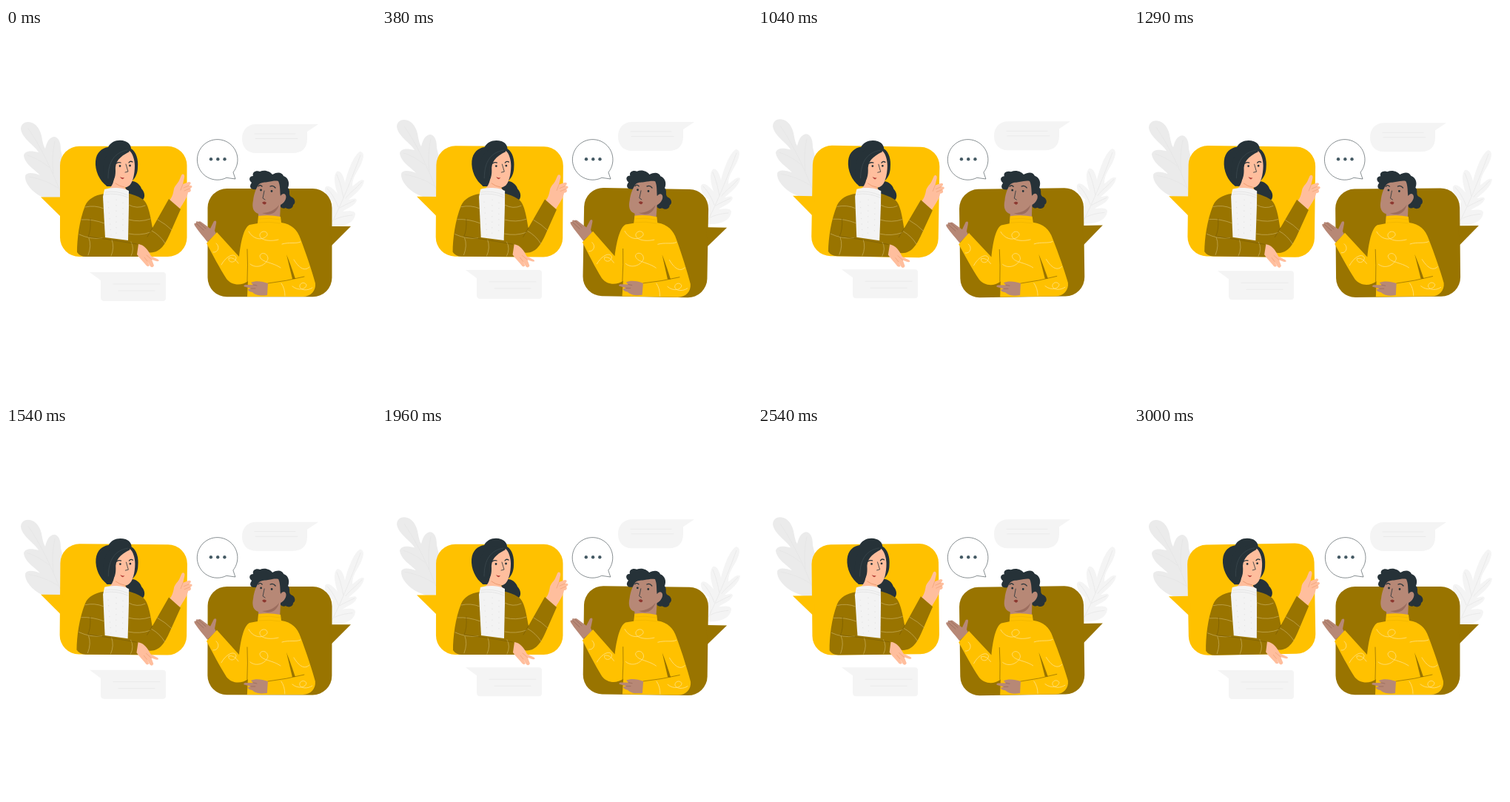
An HTML page for the animation above (3040 ms loop, 500 px wide and 500 px high).

```html
<!DOCTYPE html>
<html lang="en">
<head>
<meta charset="utf-8">
<title>Conversation</title>
<style>
  html, body { margin: 0; width: 100%; height: 100%; overflow: hidden; background: #fff; }
  svg { display: block; width: 100%; height: 100%; }
  .line { fill: none; stroke-linecap: round; stroke-linejoin: round; }
  .pale { fill: #f4f4f4; }
  .leaf { fill: #ebebeb; }
  .rule { stroke: #e8e8e8; stroke-width: .8; }
  .vein { stroke: #e2e2e2; stroke-width: .6; }
  .gold { fill: #ffc100; }
  .olive { fill: #997400; }
  .dark { fill: #263238; }
  .ink { stroke: #263238; stroke-width: .8; }
  .brow { stroke: #263238; stroke-width: 1.300; }
  .rose { fill: #ffbe9d; }
  .brown { fill: #b78876; }
  .crease { stroke: #eb996e; stroke-width: .6; }
  .stripe { stroke: #d1b970; stroke-width: .6; }
  .curl { stroke: #ffe38c; stroke-width: .8; }
  .fold { stroke: #765900; stroke-width: .6; }
</style>
</head>
<body>
<svg viewBox="0 0 500 500">
  <g class="float">
    <path class="leaf" d="M76 236 L62 234 L48 228 C36 222 25 210 26 200 C28 194 38 196 46 199 C40 192 25 184 24 172 C26 165 35 166 44 168 C39 159 21 149 20 136 C21 125 33 125 40 131 C51 142 47 153 53 163 C55 155 58 147 66 147 C73 149 74 158 74 165 L80 190 V236Z"/>
    <path class="line vein" d="M30 136 C42 153 56 178 73 220 M29 172 C42 176 50 182 58 188 M31 201 C48 204 59 209 70 216 M66 153 C63 168 62 180 64 197"/>
  </g>
  <g class="float">
    <path class="pale" d="M436 268 L442 235 C434 229 430 222 431 216 C435 210 443 218 448 224 C444 212 442 199 447 194 C453 191 457 203 458 209 C461 197 468 174 478 167 C484 167 484 174 481 181 C477 193 468 199 468 214 C473 211 479 203 484 206 C483 216 472 224 463 232 C467 232 473 228 474 233 C471 241 461 243 455 248 C462 247 471 246 472 251 C471 264 456 269 440 268Z"/>
    <path class="line vein" d="M479 172 C468 201 456 232 441 262 M447 198 C452 209 454 220 456 229 M434 217 C441 224 446 234 449 242 M481 208 C472 218 464 223 459 230 M471 233 C463 237 456 240 451 243 M468 253 C458 254 449 256 444 259"/>
  </g>
  <g class="float">
    <path class="pale" d="M338 130 H422 L407 140 V150 C407 163 399 169 388 169 H338 C326 169 319 161 319 150 C319 138 326 130 338 130Z"/>
    <path class="line rule" d="M336 143 H391 M337 149.5 H394"/>
  </g>
  <g class="float">
    <path class="pale" d="M113 330 H212 Q216 330 216 334 V365 Q216 369 212 369 H133 Q128 369 128 364 V341Z"/>
    <path class="line rule" d="M145 346 H208 M152 355 H201"/>
  </g>

  <g id="woman">
    <rect class="gold" x="73" y="159.700" width="171.500" height="149.300" rx="26"/>
    <path class="gold" d="M47 228.500 H76 V254 H73Z"/>
    <!-- hair behind the face -->
    <path class="dark" d="M162 208 C172 204 181 210 183 217 C188 222 189 230 183 234 C176 233 169 227 161 222Z"/>
    <path class="dark" d="M137 214 C126 207 120 192 121 180 C122 168 130 162 138 161 C142 153 152 150 161 153 C167 155 169 160 169 163 C176 167 179 178 178 188 C178 196 175 202 171 206 L150 214Z"/>
    <path class="rose" d="M136 220 C143 215 145 210 146 203 C146 192 146 179 151 173 C157 170 164 168 167 166 C171 169 174 178 174 186 C174 198 171 211 165 214 Q162 216 160 215 L165 221 Q148 224 136 220Z"/>
    <path class="line" stroke="#eb996e" stroke-width=".9" d="M148 210 Q153 214 160 215"/>
    <path class="dark" d="M136 214 C146 209 148 202 148 193 C147 181 153 174 167 167 L160 162 C145 161 136 168 133 179 C130 192 130 205 136 214Z"/>
    <path class="line" stroke="#46545a" stroke-width=".5" d="M164 165 C147 168 138 180 138 203"/>
    <path class="line brow" d="M149 183 Q152 181 155 182 M166 182 Q168 179 171 181"/>
    <path class="line ink" d="M162 184 L165 194 L161 195"/>
    <circle class="dark" cx="154" cy="186.500" r="1.400"/><circle class="dark" cx="167.500" cy="186" r="1.400"/>
    <path fill="#b53e36" d="M154 201 Q157 203 160 202 Q157 207 154 201Z"/>
    <!-- raised hand -->
    <path class="rose" d="M221 233 C225 228 226 223 227 217 C229 212 232 210 234 206 L237 199 C239 196 242 198 241 202 L239 211 L247 208 C251 208 250 211 247 213 C252 212 253 215 249 217 C251 220 249 222 246 222 C245 229 240 236 235 244Z"/>
    <path class="line crease" d="M239 211 L236 219 M247 213 L240 216 M248 217 L241 220"/>
    <!-- jacket -->
    <path class="olive" d="M132 224 C120 226 111 231 107 240 C99 260 96 285 96 303 Q100 309 108 309 H182 L191 303 C208 306 215 292 221 279 L236 245 L220 231 L198 270 C195 253 192 235 184 231 C178 227 171 225 164 223Z"/>
    <path fill="#f3f3f3" d="M133 218 C141 215 158 215 166 220 L166 240 L165 287 L134 283 L131 228Z"/>
    <path class="line" stroke="#dcdcdc" stroke-width=".6" d="M134 222 Q149 219 165 226 M133 225 Q149 222 165 229"/>
    <path class="line" stroke="#d8d8d8" stroke-width=".6" stroke-dasharray=".5 7" d="M138 235 L142 280 M149 232 V280 M158 236 V280"/>
    <path class="line stripe" d="M107 242 Q120 239 132 244 M102 259 Q117 258 133 264 M99 279 Q114 286 130 284 M166 239 Q177 245 188 240 M166 259 Q181 263 195 258 M166 278 Q181 281 195 276 M112 284 Q116 294 111 307 M143 286 Q147 297 142 308 M169 289 Q174 298 169 308 M197 274 Q208 280 215 291 M205 259 Q216 265 224 273"/>
    <path class="line fold" d="M114 258 Q115 274 111 282 Q143 286 177 292 M198 270 L191 282"/>
    <!-- resting hand -->
    <path class="rose" d="M179 292 C187 293 192 300 196 308 L206 313 Q208 316 203 315 L197 313 L200 321 Q198 325 195 322 L191 315 L194 321 Q191 324 188 319 L180 310 L177 306Z"/>
    <path class="line crease" d="M190 307 L197 313 M187 310 L191 315"/>
  </g>

  <g id="man">
    <rect class="olive" x="272.500" y="217" width="168" height="146.300" rx="26"/>
    <path class="olive" d="M438 268 H466 L440 294Z"/>
    <path class="dark" d="M338 218 C330 219 328 214 332 209 C327 205 329 200 334 200 C332 195 338 192 343 194 C350 191 357 194 360 198 C367 194 373 195 375 200 C381 202 384 209 381 216 C385 220 381 225 385 228 C391 230 392 237 388 239 C388 244 382 246 378 243 C374 245 370 242 369 238 L348 221Z"/>
    <path class="brown" d="M341 260 V251 C334 249 332 242 334 233 C335 224 338 216 342 211 C346 208 350 209 354 208 C360 207 364 206 368 207 C371 213 370 222 371 227 C375 221 380 225 378 231 C376 236 373 238 371 239 L370 260Z"/>
    <path fill="#9b6d5e" d="M346 250 C357 250 364 245 369 239 C366 249 359 255 346 250Z"/>
    <path class="line brow" d="M341 214 Q343 211 346 214 M357 214 Q361 212 364 216"/>
    <path class="line ink" d="M349 220 L347 230 L350 232"/>
    <circle class="dark" cx="344.500" cy="219" r="1.400"/><circle class="dark" cx="359" cy="220.500" r="1.400"/>
    <path fill="#8d3830" d="M346 236 Q349 233 352 236 Q350 241 346 236Z"/>
    <!-- open hand -->
    <path class="brown" d="M272 289 C267 282 260 275 255 267 Q253 263 257 264 Q256 260 260 262 Q262 260 265 263 L276 271 L281 261 Q285 259 284 264 L282 274 L284 278Z"/>
    <path class="line" stroke="#8e6252" stroke-width=".6" d="M257 264 L267 273 M260 262 L270 271"/>
    <!-- sweater -->
    <path class="gold" d="M341 254 Q356 252 371 255 L372 263 C386 265 394 273 398 285 C406 306 414 330 418 345 C419 355 412 363 401 363 H326 L327 342 C318 349 305 348 298 339 C289 325 279 306 271 291 L285 276 L315 309 C317 291 321 270 329 266 L340 264Z"/>
    <path class="olive" d="M379 306 C384 318 388 330 391 339 L387 339Z"/>
    <path class="line fold" d="M326 299 Q327 320 326 342 M354 345 Q379 342 403 336"/>
    <path class="line" stroke="#e6ae00" stroke-width=".5" d="M342 258 Q356 256 371 259 M341 263 Q356 261 371 264"/>
    <path class="line curl" d="M328 275 C334 286 347 288 353 280 C354 274 345 273 343 279 C342 287 357 289 368 286 M373 292 C383 289 392 292 398 289 M284 291 C290 296 286 304 280 303 M291 320 C297 309 308 303 311 310 C311 318 300 318 301 311 Q308 309 314 318 M330 319 C338 326 351 321 354 312 C354 304 345 302 343 308 C344 317 360 316 371 324 M389 313 C395 323 403 330 410 323 M372 345 Q377 352 377 362 M387 349 C395 356 406 353 406 347 C403 342 396 345 397 350 C399 355 408 355 414 351"/>
    <!-- resting hand -->
    <path class="brown" d="M354 345 C346 342 337 341 331 344 L334 347 L323 347 Q319 349 324 350 L331 352 L327 353 Q327 356 333 357 C338 362 346 362 353 361Z"/>
    <path class="line" stroke="#8e6252" stroke-width=".6" d="M331 352 L337 352 M334 347 L339 348"/>
  </g>

  <g id="speech">
    <path fill="#fff" stroke="#263238" stroke-width=".55" stroke-linejoin="round" d="M307 195 L310 204 L298 202.300 A27.300 27.300 0 1 1 307 195Z"/>
    <g fill="#455a64"><circle cx="277" cy="177.300" r="2.200"/><circle cx="286.300" cy="177.300" r="2.200"/><circle cx="295.500" cy="177.300" r="2.200"/></g>
  </g>
</svg>
<script>
  const LOOP = 3040;
  const floaters = document.querySelectorAll('.float');
  const [woman, man, speech] = ['woman', 'man', 'speech'].map(id => document.getElementById(id));

  // Linear interpolation through [position, value] stops, repeating each period.
  function track(time, period, stops) {
    const p = (time % period) / period;
    const i = stops.findIndex(stop => stop[0] > p);
    const [p0, v0] = stops[i - 1], [p1, v1] = stops[i];
    return v0 + (v1 - v0) * (p - p0) / (p1 - p0);
  }

  const RISE = [[0, 0], [.5, -6], [1, 0]];
  const SWAY = [[0, 0], [.25, 1], [.75, -1], [1, 0]];
  const DRIFT = [[0, 0], [.3, -1.2], [.5, -1.4], [.7, -2.1], [1, 0]];

  function draw(time) {
    const rise = track(time, 1500, RISE);
    floaters.forEach(el => el.setAttribute('transform', `translate(0 ${rise})`));
    woman.setAttribute('transform', `rotate(${track(time, 4000, SWAY)} 149 237)`);
    man.setAttribute('transform', `rotate(${track(time, 1500, SWAY)} 360 278)`);
    speech.setAttribute('transform', `translate(${track(time, 1500, DRIFT)} 0)`);
  }

  const start = performance.now();
  function tick() {
    draw((performance.now() - start) % LOOP);
    requestAnimationFrame(tick);
  }
  tick();
</script>
</body>
</html>
```
